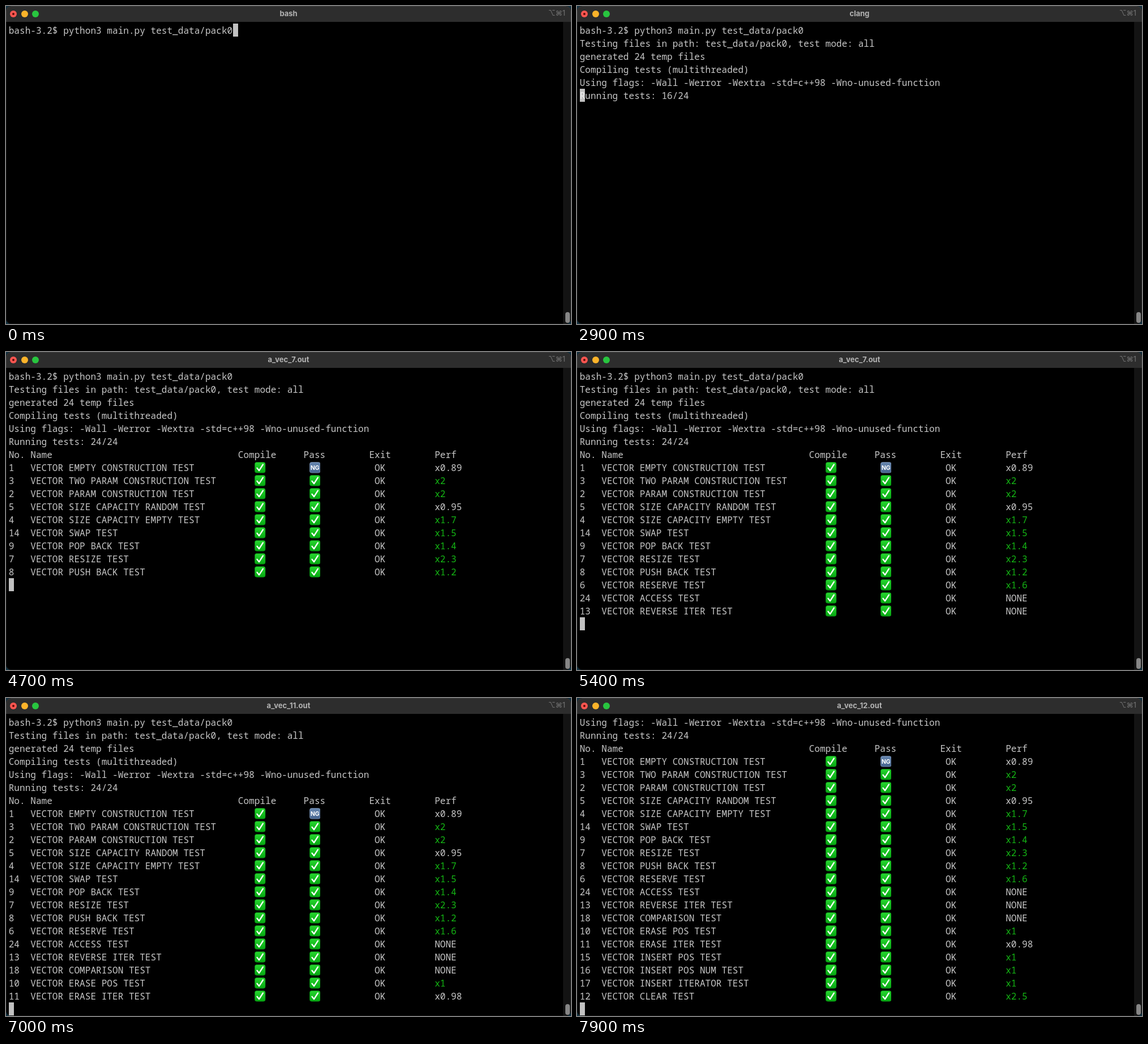
These frames come from a looping animation (998x561 px, 8 s). An HTML page:

```html
<!DOCTYPE html>
<html lang="en">
<head>
<meta charset="utf-8">
<title>Terminal</title>
<style>
  html, body { margin: 0; width: 100%; height: 100%; overflow: hidden; background: #12303f; }
  #win { position: absolute; left: 0; top: 0; width: 998px; height: 561px; background: #000; border-radius: 9px; overflow: hidden; }
  #edge { position: absolute; inset: 0; border-radius: 9px; box-shadow: inset 0 0 0 1px rgba(255, 255, 255, .08); }
  #bar { position: absolute; left: 0; top: 0; width: 100%; height: 28px; background: #2d2d2d; font-family: Inter, "DejaVu Sans", sans-serif; }
  #bar i { position: absolute; top: 7.5px; width: 12px; height: 12px; border-radius: 50%; }
  #bar .close::after { content: ""; position: absolute; left: 4px; top: 4px; width: 4px; height: 4px; border-radius: 50%; background: #5d0d0a; }
  #title { position: absolute; left: 0; width: 998px; top: 0; line-height: 27px; text-align: center; font-size: 13px; font-weight: 700; color: #b3b3b3; }
  #key { position: absolute; right: 10px; top: 0; line-height: 26px; font-size: 12.5px; font-weight: 500; color: #6c6c6c; }
  #track { position: absolute; left: 984px; top: 28px; width: 14px; bottom: 0; background: #131313; }
  #thumb { position: absolute; left: 4px; top: 512px; width: 8px; height: 19px; border-radius: 4px; background: #868686; }
  #term { position: absolute; left: 4.7px; top: 31px; font: 16.08px/23px "Noto Sans Mono", monospace; color: #c7c7c7; white-space: pre; font-variant-ligatures: none; }
  #lines { position: relative; top: 1px; }
  .line { position: relative; height: 23px; }
  .good { color: #14b614; }
  .mark { position: absolute; top: 1.1px; width: 19.6px; height: 19.8px; }
  #cursor { position: absolute; margin-left: .3px; width: 9.4px; height: 23px; line-height: 25px; background: #c1c1c1; color: #f2f2f2; }
</style>
</head>
<body>
<div id="win">
  <div id="bar">
    <i class="close" style="left:7px;background:#fb5550"></i>
    <i style="left:27px;background:#fbb32a"></i>
    <i style="left:46px;background:#28c53f"></i>
    <div id="title">bash</div>
    <div id="key">⌥⌘1</div>
  </div>
  <div id="track"><div id="thumb"></div></div>
  <div id="term"><div id="lines"></div><div id="cursor"></div></div>
  <div id="edge"></div>
</div>
<svg width="0" height="0" style="position:absolute">
  <defs>
    <linearGradient id="green" x2="0" y2="1">
      <stop stop-color="#27d62f"/><stop offset="1" stop-color="#06a812"/>
    </linearGradient>
    <linearGradient id="blue" x2="0" y2="1">
      <stop stop-color="#6787b0"/><stop offset="1" stop-color="#46648f"/>
    </linearGradient>
    <symbol id="ok" viewBox="0 0 20 20">
      <rect x=".5" y=".5" width="19" height="19" rx="3.4" fill="url(#green)" stroke="#0a8a14" stroke-width=".8"/>
      <path d="M4.6 10.8 8.3 15.4 15.3 4.4" fill="none" stroke="#fff" stroke-width="2.4" stroke-linecap="round" stroke-linejoin="round"/>
    </symbol>
    <symbol id="ng" viewBox="0 0 20 20">
      <rect x=".5" y=".5" width="19" height="19" rx="3.4" fill="url(#blue)" stroke="#7f96b5" stroke-width=".8"/>
      <text x="10" y="13.9" text-anchor="middle" font-family="Inter, sans-serif" font-weight="700" font-size="10.6" fill="#fff">NG</text>
    </symbol>
  </defs>
</svg>
<script>
const LOOP = 8000, STEP = 100, CELL = 9.65, ROW = 23, LAST_ROW = 22;
const $ = id => document.getElementById(id);

const COMMAND = 'bash-3.2$ python3 main.py test_data/pack0';
const INTRO = [
  'Testing files in path: test_data/pack0, test mode: all',
  'generated 24 temp files',
  'Compiling tests (multithreaded)',
  'Using flags: -Wall -Werror -Wextra -std=c++98 -Wno-unused-function'
];

// time, title
const TITLES = [
  [0, 'bash'], [500, 'Python'], [800, 'clang'], [4400, 'a_vec_7.out'],
  [6000, 'a_vec_11.out'], [7600, 'a_vec_12.out']
];

// time, number, name, speed (0 = none)
const TESTS = [
  [3100, 1, 'EMPTY CONSTRUCTION', 0.89],
  [3300, 3, 'TWO PARAM CONSTRUCTION', 2],
  [3400, 2, 'PARAM CONSTRUCTION', 2],
  [3600, 5, 'SIZE CAPACITY RANDOM', 0.95],
  [3900, 4, 'SIZE CAPACITY EMPTY', 1.7],
  [4100, 14, 'SWAP', 1.5],
  [4300, 9, 'POP BACK', 1.4],
  [4500, 7, 'RESIZE', 2.3],
  [4700, 8, 'PUSH BACK', 1.2],
  [4900, 6, 'RESERVE', 1.6],
  [5100, 24, 'ACCESS', 0],
  [5300, 13, 'REVERSE ITER', 0],
  [5800, 18, 'COMPARISON', 0],
  [6300, 10, 'ERASE POS', 1],
  [6800, 11, 'ERASE ITER', 0.98],
  [7100, 15, 'INSERT POS', 1],
  [7200, 16, 'INSERT POS NUM', 1],
  [7500, 17, 'INSERT ITERATOR', 1],
  [7800, 12, 'CLEAR', 2.5]
];

const columns = (no, name, compile, pass, exit, perf) =>
  String(no).padEnd(4) + name.padEnd(38) + compile.padEnd(12) + pass.padEnd(12) + exit.padEnd(12) + perf;

const mark = (id, col) =>
  `<svg class="mark" style="left:${col * CELL + .4}px"><use href="#${id}"/></svg>`;

function testLine([, no, name, speed]) {
  const perf = !speed ? 'NONE' : speed < 1 ? 'x' + speed : `<span class="good">x${speed}</span>`;
  return columns(no, `VECTOR ${name} TEST`, '', '', ' OK', perf) +
    mark('ok', 45) + mark(no === 1 ? 'ng' : 'ok', 55);
}

const count = (t, from, to) =>
  Math.max(1, Math.min(24, Math.round(24 * (t - from) / (to - from)))) + '/24';

function screen(t) {
  const lines = [COMMAND];
  if (t < 500) return { lines, row: 0, col: COMMAND.length };
  if (t >= 600) lines.push(...INTRO);
  if (t >= 700) {
    lines.push(t < 2800
      ? 'Compiling test ' + count(t, 600, 1500)
      : 'Running tests: ' + count(t, 2700, 3000));
  }
  if (t >= 700 && t < 3000) return { lines, row: lines.length - 1, col: 0 };
  if (t >= 3000) {
    lines.push(columns('No.', 'Name', 'Compile', 'Pass', 'Exit', 'Perf'));
    lines.push(...TESTS.filter(test => test[0] <= t).map(testLine));
  }
  const scrolled = Math.max(0, lines.length - LAST_ROW);
  return { lines: lines.slice(scrolled), row: lines.length - scrolled, col: 0 };
}

function draw(t) {
  const { lines, row, col } = screen(t);
  $('lines').innerHTML = lines.map(s => `<div class="line">${s}</div>`).join('');
  $('cursor').style.left = col * CELL + 'px';
  $('cursor').style.top = row * ROW + 'px';
  $('cursor').textContent = (lines[row] || '').charAt(col);
  $('title').textContent = TITLES.filter(item => item[0] <= t).pop()[1];
}

const start = performance.now();
let shown = -1;
function tick() {
  const t = Math.floor((performance.now() - start) % LOOP / STEP) * STEP;
  if (t !== shown) draw(shown = t);
  requestAnimationFrame(tick);
}
tick();
</script>
</body>
</html>
```
